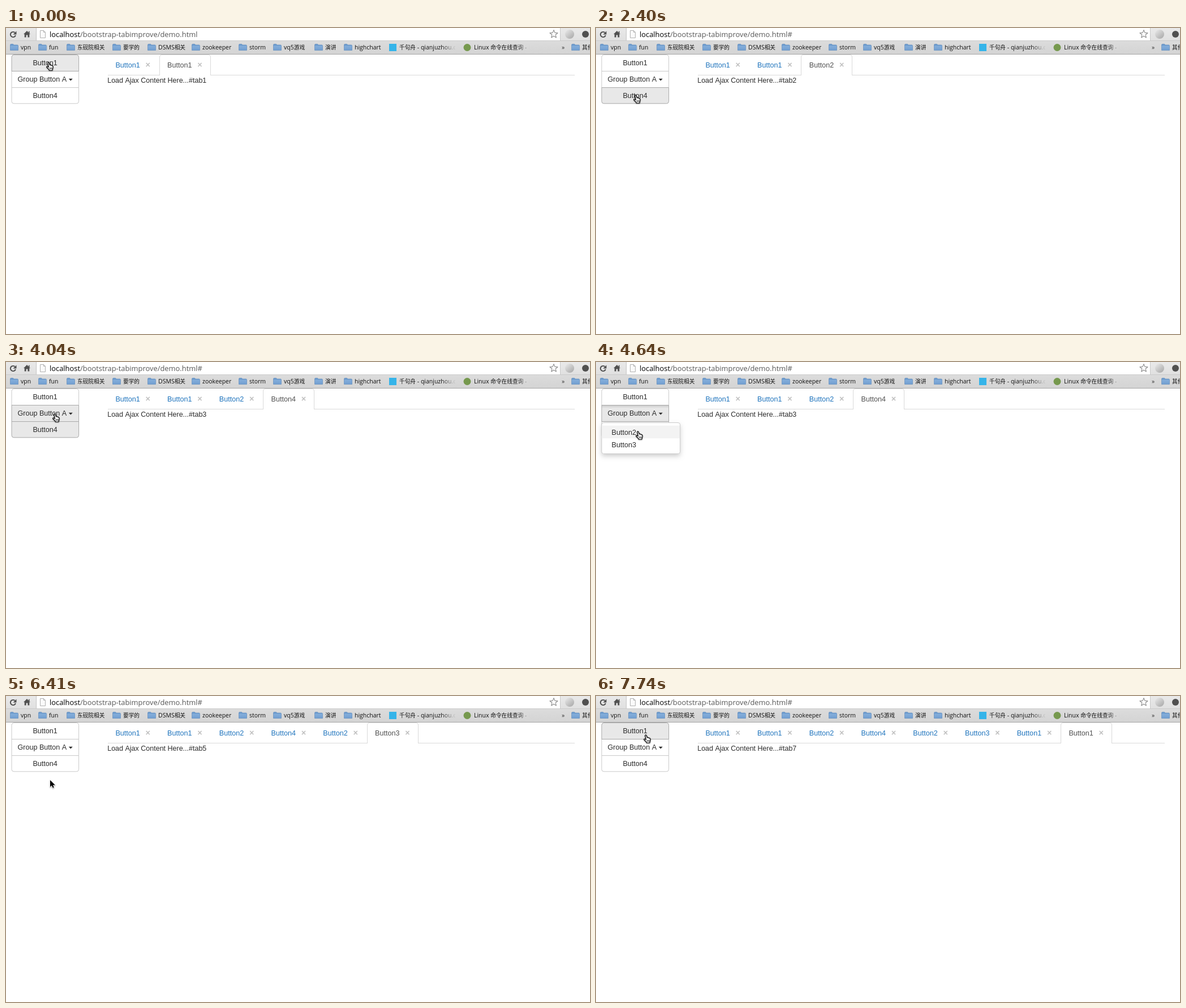
Recreate the animation shown at these times as an HTML page with a canvas. Size 1032 by 542 pixels, loop 8 s.

```html
<!DOCTYPE html>
<html lang="en">
<head>
<meta charset="utf-8">
<title>Tab demo</title>
<style>
html, body { margin: 0; width: 100%; height: 100%; overflow: hidden; background: #fff; }
canvas { display: block; }
</style>
</head>
<body>
<canvas id="stage" width="1032" height="542"></canvas>
<script>
const ctx = document.getElementById('stage').getContext('2d');
const LOOP = 8000;
const SANS = '"Liberation Sans", Arial, sans-serif';
const UI = '"Open Sans", "Noto Sans", "Noto Sans CJK SC", sans-serif';
const CJK = '"Noto Sans CJK SC", "Noto Sans CJK", sans-serif';
const INK = '#2b2b2b';

const TABS = [1, 1, 2, 4, 2, 3, 1, 1].map(n => 'Button' + n);
const BOOKMARKS = [
  [26, 'vpn'], [76, 'fun'], [126, '东砚院相关'], [207, '要学的'], [269, 'DSMS相关'],
  [347, 'zookeeper'], [430, 'storm'], [491, 'vq5游戏'], [564, '演讲'],
  [616, 'highchart'], [1018, '其他书签']
];
const BUTTONS = [
  { id: 'one', label: 'Button1', y: 47.5, h: 29, radii: [4, 4, 0, 0], base: 66 },
  { id: 'group', label: 'Group Button A', y: 76.5, h: 29, radii: 0, base: 95 },
  { id: 'four', label: 'Button4', y: 105.5, h: 28.3, radii: [0, 0, 4, 4], base: 124 }
];

// time, pointer x, pointer y
const PATH = [
  [0, 71, 60], [1050, 75, 72], [1200, 68, 85], [1650, 67, 85], [1800, 62, 112],
  [1950, 60, 120], [2250, 60, 121], [2400, 66, 118], [2550, 70, 116], [2700, 72, 114],
  [3150, 150, 101], [3300, 219, 82], [3450, 222, 80], [3600, 215, 84], [3750, 170, 92],
  [3890, 115, 92], [4040, 82, 91], [4340, 82, 90], [4490, 74, 112], [4640, 70, 122],
  [5230, 82, 89], [5820, 80, 118], [5970, 75, 143], [6410, 74, 148], [6560, 76, 130],
  [6700, 80, 108], [6850, 83, 86], [7000, 84, 69], [7450, 84, 68]
];
const OPENED = [[0, 2], [2250, 3], [3000, 4], [5080, 5], [6410, 6], [7300, 7], [7740, 8]];
const MENU = [[0, false], [1650, true], [2250, false], [4340, true], [5080, false],
  [5670, true], [6410, false]];
const FOCUS = [[0, 'one'], [1650, ''], [3000, 'four'], [4340, ''], [7300, 'one']];

const at = (track, t) => track.reduce((last, key) => key[0] <= t ? key : last);

function text(str, x, y, size, color, family = SANS, weight = 400) {
  ctx.font = `${weight} ${size}px ${family}`;
  ctx.fillStyle = color;
  ctx.fillText(str, x, y);
  return ctx.measureText(str).width;
}

function label(str, x, y, color = '#111') {
  for (const run of str.split(/([\u4e00-\u9fff]+)/)) {
    const wide = /[\u4e00-\u9fff]/.test(run);
    x += text(run, x, y, wide ? 9.7 : 10.5, color, wide ? CJK : UI, 500);
  }
}

function rect(x, y, w, h, color) {
  ctx.fillStyle = color;
  ctx.fillRect(x, y, w, h);
}

function box(x, y, w, h, radii, fill, stroke) {
  ctx.beginPath();
  ctx.roundRect(x, y, w, h, radii);
  ctx.fillStyle = fill;
  ctx.fill();
  if (stroke) {
    ctx.strokeStyle = stroke;
    ctx.lineWidth = 1;
    ctx.stroke();
  }
}

function disc(x, y, r, color) {
  ctx.beginPath();
  ctx.arc(x, y, r, 0, 7);
  ctx.fillStyle = color;
  ctx.fill();
}

function shape(d, x, y, fill, stroke, width = 1) {
  const path = new Path2D(d);
  ctx.save();
  ctx.translate(x, y);
  ctx.lineJoin = 'round';
  if (fill) {
    ctx.fillStyle = fill;
    ctx.fill(path);
  }
  if (stroke) {
    ctx.strokeStyle = stroke;
    ctx.lineWidth = width;
    ctx.stroke(path);
  }
  ctx.restore();
}

function shade(x0, y0, x1, y1, from, to) {
  const g = ctx.createLinearGradient(x0, y0, x1, y1);
  g.addColorStop(0, from);
  g.addColorStop(1, to);
  return g;
}

function folder(x) {
  shape('M0.5 2Q0.5 0.5 2 0.5H5.5L7 2H13Q14.5 2 14.5 3.5V11.5H0.5Z', x, 28, '#6d9bcd', '#6590c0', 0.7);
  rect(x + 1, 31.5, 13, 7.5, shade(0, 31, 0, 39, '#86b0dc', '#729fd1'));
}

function addressBar(hash) {
  rect(0, 0, 1032, 22, shade(0, 0, 0, 22, '#e9e9e9', '#e0e0e0'));
  rect(54, 0, 925, 22, '#fff');
  rect(53, 0, 1, 22, '#c4c4c4');
  rect(979, 0, 1, 22, '#c8c8c8');

  ctx.beginPath();
  ctx.arc(12.5, 11.5, 4.6, 0.3, 5.5);
  ctx.strokeStyle = '#505050';
  ctx.lineWidth = 2;
  ctx.stroke();
  shape('M6 0V6H0Z', 12.5, 5.5, '#505050');
  shape('M6 0L12 6H10.3V11.5H7.4V7.5H4.6V11.5H1.7V6H0ZM9 0.8H10.6V4H9Z', 31, 5, '#505050');
  shape('M0.5 0.5H6.5L9.5 3.5V13.5H0.5ZM6.5 0.5V3.5H9.5', 60, 4, '#fafafa', '#b0b0b0');

  let star = '';
  for (let i = 0; i < 10; i++) {
    const r = i % 2 ? 3.3 : 7.4, a = i * Math.PI / 5;
    star += `${i ? 'L' : 'M'}${r * Math.sin(a)} ${-r * Math.cos(a)}`;
  }
  shape(star + 'Z', 968, 11, '#fff', '#8c8c8c', 1.1);
  disc(996, 11, 8, shade(990, 4, 1002, 18, '#e4e4e4', '#ababab'));
  disc(1024, 11, 6, '#505050');

  const host = text('localhost', 77, 15.5, 12.9, '#000', UI, 500);
  text('/bootstrap-tabimprove/demo.html' + hash, 77 + host, 15.5, 12.9, '#585858', UI);
}

function bookmarkBar() {
  rect(0, 22, 1032, 24, shade(0, 22, 0, 46, '#dcdcdc', '#d4d4d4'));
  rect(0, 22, 1032, 1, '#cacaca');
  rect(0, 46, 1032, 1, '#a6a6a6');
  for (const [x, name] of BOOKMARKS) {
    folder(x - 19);
    label(name, x, 38.3);
  }
  rect(677, 28, 13, 13, '#35b4e9');
  disc(815, 34.5, 6.5, '#76994e');

  ctx.save();
  ctx.beginPath();
  ctx.rect(690, 23, 105, 23);
  ctx.rect(822, 23, 103, 23);
  ctx.clip();
  label('千句舟 - qianjuzhou.com', 695, 38.3, shade(770, 0, 795, 0, '#111', 'rgba(17,17,17,0)'));
  label('Linux 命令在线查询 - Linux', 827, 38.3, shade(905, 0, 925, 0, '#111', 'rgba(17,17,17,0)'));
  ctx.restore();
  label('»', 982, 38, '#333');
}

function tabStrip(count) {
  rect(180, 83, 825, 1, '#dadada');
  TABS.slice(0, count).forEach((name, i) => {
    const x = 180 + i * 91.72, active = i === count - 1;
    if (active) {
      const left = Math.round(x) - 0.5, right = left + 90;
      rect(left, 82, 90, 2, '#fff');
      shape(`M${left} 84V51Q${left} 47.5 ${left + 3.5} 47.5H${right - 3.5}Q${right} 47.5 ${right} 51V84`,
        0, 0, null, '#d9d9d9');
    }
    text(name, x + 13.4, 70, 12.6, active ? '#505050' : '#1f74bd');
    ctx.textAlign = 'center';
    text('×', x + 70.8, 70, 14.5, '#c0c0c0', SANS, 700);
    ctx.textAlign = 'left';
  });
  text(`Load Ajax Content Here...#tab${count - 1}`, 179.2, 97, 12.5, INK);
}

function buttons(lit, open) {
  const order = [...BUTTONS].sort((a, b) => lit.includes(a.id) - lit.includes(b.id));
  for (const b of order) {
    const on = lit.includes(b.id);
    box(10, b.y, 118.6, b.h, b.radii, on ? '#e8e8e8' : '#fff', on ? '#a9a9a9' : '#c9c9c9');
    const main = b.id === 'group';
    if (open && main) {
      rect(10.5, 77, 117.6, 5, shade(0, 77, 0, 82, 'rgba(0,0,0,.12)', 'rgba(0,0,0,0)'));
    }
    ctx.textAlign = main ? 'left' : 'center';
    text(b.label, main ? 20.4 : 69.1, b.base, 12.6, INK);
    ctx.textAlign = 'left';
  }
  shape('M0 0H7L3.5 3.6Z', 110.8, 89.8, INK);
}

function menu(hover) {
  ctx.save();
  ctx.shadowColor = 'rgba(0,0,0,.2)';
  ctx.shadowBlur = 8;
  ctx.shadowOffsetY = 4;
  box(10, 107.5, 138.6, 55, 3.6, '#fff');
  ctx.restore();
  box(10, 107.5, 138.6, 55, 3.6, '#fff', '#cbcbcb');
  ['Button2', 'Button3'].forEach((name, i) => {
    const y = 112.6 + i * 22.7;
    if (hover === 'item' + i) rect(10.5, y, 137.6, 22.7, '#f3f3f3');
    text(name, 27.6, y + 15.9, 12.6, INK);
  });
}

function pointer(x, y, hand) {
  ctx.save();
  ctx.shadowColor = 'rgba(0,0,0,.3)';
  ctx.shadowBlur = 2;
  ctx.shadowOffsetY = 1;
  if (hand) {
    shape('M2.8 2.4Q2.6 .9 3.9 .8Q5 .8 5.4 2.2L6.4 5.4Q7.6 4.9 8.3 5.9Q9.6 5.4 10.2 6.6Q11.8 6.4 12.1 8' +
      'Q12.5 10.2 11.6 12L11 15H5.4L4.8 13.4L1.3 10Q.3 8.6 1.3 8Q2.3 7.7 4.3 9.4Z', x, y, '#fff', '#000', 1.2);
    ctx.shadowColor = 'transparent';
    shape('M6.6 10V13M8.3 10V13M10 10V13', x, y, null, '#111', 0.8);
  } else {
    const arrow = 'M0 0V12L2.8 9.4L4.8 13.8L6.8 12.9L4.9 8.7H8.8Z';
    shape(arrow, x + 4, y + 1, '#000', '#fff', 1.6);
    ctx.shadowColor = 'transparent';
    shape(arrow, x + 4, y + 1, '#000');
  }
  ctx.restore();
}

function hit(x, y, open) {
  if (open && x > 10 && x < 149 && y > 107 && y < 163) return y < 135.3 ? 'item0' : 'item1';
  const b = x > 10 && x < 129 && BUTTONS.find(b => y >= b.y && y < b.y + b.h);
  return b ? b.id : '';
}

function draw(t) {
  const [, x, y] = at(PATH, t);
  const open = at(MENU, t)[1];
  const hover = hit(x + 4, y + 1, open);
  const lit = [hover, at(FOCUS, t)[1], open ? 'group' : ''];

  rect(0, 0, 1032, 542, '#fff');
  addressBar(t >= 2250 ? '#' : '');
  bookmarkBar();
  tabStrip(at(OPENED, t)[1]);
  buttons(lit, open);
  if (open) menu(hover);
  pointer(x, y, hover || (x > 180 && y < 84));
}

const start = performance.now();
function tick() {
  draw((performance.now() - start) % LOOP);
  requestAnimationFrame(tick);
}
tick();
</script>
</body>
</html>
```
